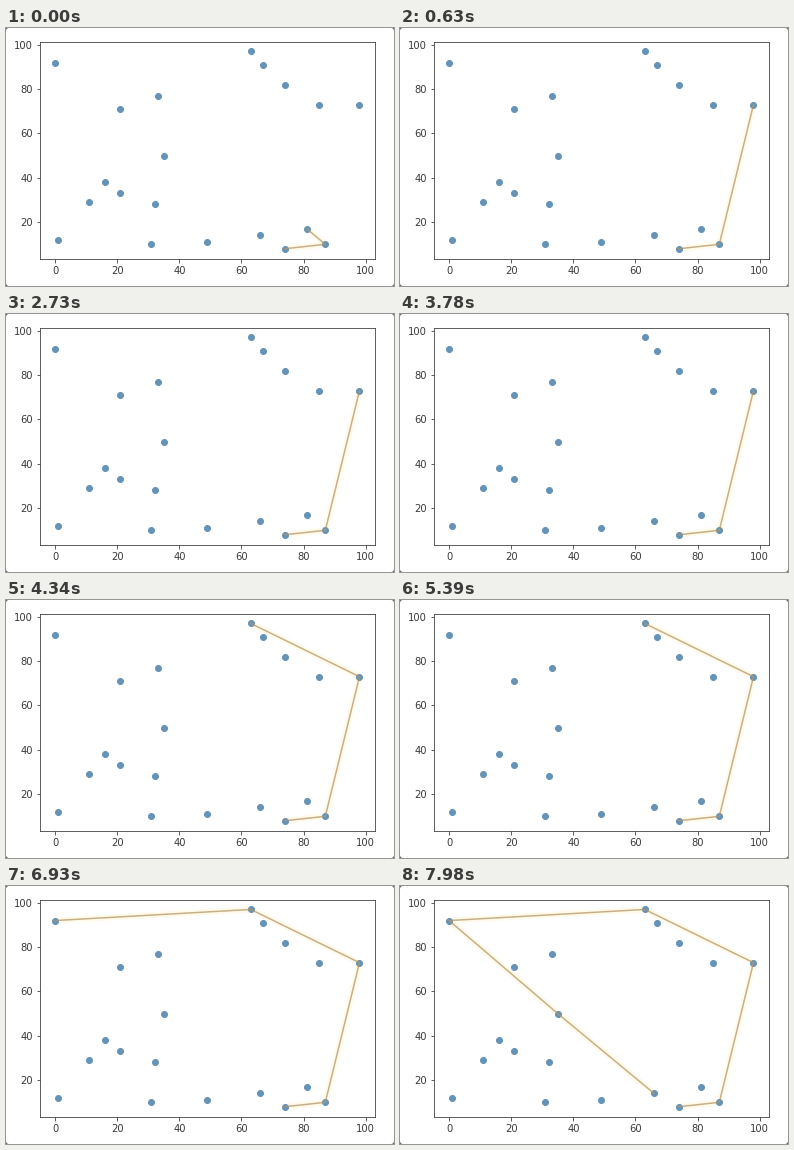
Recreate the animation shown at these times as a matplotlib script. Size 388 by 258 pixels, loop 8 s.

```python
import math

import matplotlib.pyplot as plt
from matplotlib.animation import FuncAnimation
from matplotlib.patches import FancyBboxPatch
from matplotlib.transforms import IdentityTransform

W, H, DPI = 388, 258, 72
LOOP, STEP, TICK = 8000, 20, 70
DOT, LINE, GLOW, INK, CORNER = "#6593b8", "#b59566", "#fffaea", "#3a3a3a", "#666666"

# The scattered points are the scan's input; everything else follows from them.
POINTS = [
    (0, 92), (1, 12), (11, 29), (16, 38), (21, 33), (21, 71), (32, 28),
    (31, 10), (33, 77), (35, 50), (49, 11), (66, 14), (63, 97), (67, 91),
    (74, 82), (74, 8), (81, 17), (87, 10), (85, 73), (98, 73),
]


def cross(a, b, c):
    return (b[0] - a[0]) * (c[1] - b[1]) - (b[1] - a[1]) * (c[0] - b[0])


def graham_states(points):
    """Yield the hull stack after every push and pop of a Graham scan."""
    base = min(points, key=lambda p: p[1])
    rest = sorted((p for p in points if p != base),
                  key=lambda p: math.atan2(p[1] - base[1], p[0] - base[0]))
    stack = [base, *rest[:2]]
    yield stack[:]
    for p in rest[2:]:
        while len(stack) > 2 and cross(stack[-2], stack[-1], p) <= 0:
            stack.pop()
            yield stack[:]
        stack.append(p)
        yield stack[:]


STATES = list(graham_states(POINTS))
# Each scan step takes about 7.5 ticks and starts on a whole tick.
CHANGES = [TICK * math.floor(1.9 + 7.53 * k) for k in range(len(STATES) - 1)]

plt.rcParams["font.family"] = "DejaVu Sans"
fig = plt.figure(figsize=(W / DPI, H / DPI), dpi=DPI, facecolor=CORNER)
fig.add_artist(FancyBboxPatch(
    (0, 0), W, H, boxstyle="round,pad=0,rounding_size=3", fc="white", lw=0,
    transform=IdentityTransform(), zorder=-1))

ax = fig.add_axes([33.9 / W, 27.4 / H, 334.8 / W, 217 / H])
ax.scatter(*zip(*POINTS), color=DOT, zorder=2)
ax.tick_params(color=INK, labelcolor=INK, labelsize=10)
for spine in ax.spines.values():
    spine.set_edgecolor(INK)

glow, = ax.plot([], [], color=GLOW, lw=6, zorder=1)
path, = ax.plot([], [], color=LINE, lw=1.5, alpha=0.75, zorder=3)


def update(i):
    # A change that falls inside this frame's span already shows.
    step = sum(t < (i + 1) * STEP for t in CHANGES)
    for line in (glow, path):
        line.set_data(*zip(*STATES[step]))
    return glow, path


anim = FuncAnimation(fig, update, frames=LOOP // STEP, interval=STEP,
                     repeat=True, repeat_delay=0)
plt.show()
```
